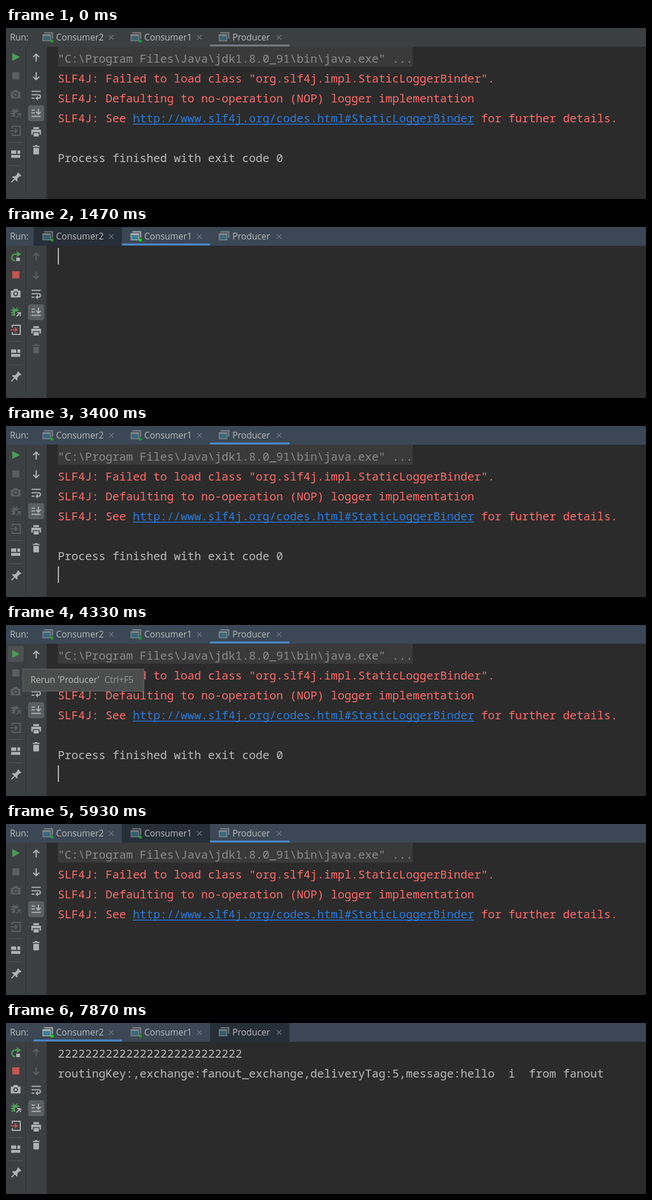
These frames come from a looping animation (1125x301 px, 8000 ms). An HTML page:

```html
<!DOCTYPE html>
<html lang="en">
<head>
<meta charset="utf-8">
<title>Run console</title>
<style>
  html, body { margin: 0; width: 100%; height: 100%; overflow: hidden; background: #2b2b2b; }
  svg { display: block; }
  text { white-space: pre; fill: #bbb; }
  .ui { font: 15.5px "Open Sans", "Noto Sans", sans-serif; }
  .code { font: 20px "Noto Sans Mono", "Liberation Mono", monospace; }
  .line { fill: none; }
</style>
</head>
<body>
<svg id="stage" width="1125" height="301" viewBox="0 0 1125 301"></svg>
<script>
const LOOP = 8000;
const ROW = 35;
const GREY = '#afb1b3', OFF = '#5b5e60', GREEN = '#499c54', RED = '#c75450', ERROR = '#ff6b68';
const PANEL = '#3c3f41', EDITOR = '#2b2b2b';
const stage = document.getElementById('stage');

const tabs = [
  { name: 'Consumer2', x: 48.6, w: 155, close: 136.4 },
  { name: 'Consumer1', x: 203.6, w: 155, close: 136.4 },
  { name: 'Producer', x: 358.6, w: 139.8, close: 121.4 }
];
const [C2, C1, PRODUCER, NONE] = [0, 1, 2, -1];

const command = { text: '"C:\\Program Files\\Java\\jdk1.8.0_91\\bin\\java.exe" ...', fill: '#8c8c8c', folded: true };
const error = text => ({ text, fill: ERROR });
const warnings = [
  error('SLF4J: Failed to load class "org.slf4j.impl.StaticLoggerBinder".'),
  error('SLF4J: Defaulting to no-operation (NOP) logger implementation'),
  error('SLF4J: See <tspan fill="#287bde">http://www.slf4j.org/codes.html#StaticLoggerBinder</tspan> for further details.')
];
warnings[2].link = [223, 600];
const plain = text => ({ text, fill: '#bbb' });
const warned = [command, ...warnings];
const finished = [...warned, plain(''), plain('Process finished with exit code 0')];
const received = digit => [
  plain(digit.repeat(27)),
  plain('routingKey:,exchange:fanout_exchange,deliveryTag:5,message:hello  i  from fanout')
];

// Toolbar looks: running process, available navigation, clearable output.
const idle = { running: false, nav: true, trash: true };
const listening = { running: true, nav: false, trash: false };

// Each step changes only the listed parts; caret is a row number, 0 hides it.
const steps = [
  [0, { focus: false, tab: PRODUCER, hover: NONE, rows: finished, caret: 0, ...idle }],
  [330, { hover: C2 }],
  [730, { hover: C1 }],
  [1070, { focus: true, caret: 7 }],
  [1130, { tab: C1, rows: [], caret: 1 }],
  [1200, listening],
  [1470, { hover: C2 }],
  [1670, { caret: 0 }],
  [2200, { caret: 1 }],
  [2400, { tab: C2 }],
  [2530, { hover: C1 }],
  [2600, { hover: PRODUCER }],
  [2870, { caret: 0 }],
  [3200, { tab: PRODUCER, rows: finished, caret: 7 }],
  [3270, idle],
  [3400, { hover: NONE }],
  [3730, { caret: 0 }],
  [3930, { upHover: true }],
  [4000, { upHover: false }],
  [4200, { caret: 7, playHover: '#4c5052' }],
  [4270, { tip: 0.6 }],
  [4330, { tip: 1 }],
  [4400, { tip: 0, playHover: '#5c6164' }],
  [4600, { playHover: '' }],
  [5000, { rows: [], caret: 0, dot: true, nav: false, trash: false }],
  [5200, { rows: [command] }],
  [5470, { rows: warned }],
  [5670, { running: true, nav: true, trash: true }],
  [5930, { ...idle, dot: false, hover: C1 }],
  [6070, { rows: finished, caret: 7 }],
  [6130, { tab: C1, rows: received('1'), caret: 3 }],
  [6200, { ...listening, trash: true }],
  [6670, { caret: 0 }],
  [6730, { hover: C2 }],
  [7200, { caret: 3 }],
  [7270, { tab: C2, rows: received('2') }],
  [7530, { hover: C1 }],
  [7670, { closeHover: true }],
  [7730, { closeHover: false, caret: 0 }],
  [7870, { hover: PRODUCER }]
];

const rect = (x, y, w, h, fill, extra = '') =>
  `<rect x="${x}" y="${y}" width="${w}" height="${h}" fill="${fill}" ${extra}/>`;
const shape = (d, fill, extra = '') => `<path d="${d}" fill="${fill}" ${extra}/>`;
const line = (d, stroke, width = 2.2) =>
  `<path class="line" d="${d}" stroke="${stroke}" stroke-width="${width}"/>`;
const label = (x, y, text, fill = '#bbb') =>
  `<text class="ui" x="${x}" y="${y}" style="fill:${fill}">${text}</text>`;

function drawTab(tab, i, s) {
  const { x, w } = tab, closeX = x + tab.close;
  const selected = s.tab === i, live = i !== PRODUCER || s.dot;
  const bright = selected && live;
  let out = '';
  if (s.hover === i) out += rect(x, 0, w, 33, s.focus ? '#262e37' : '#2b2d2f');
  if (selected) out += rect(x, 29, w, 3.5, s.focus ? '#4a88c7' : '#747a80');
  out += `<g opacity="${bright ? 1 : 0.6}">`
    + line(`M${x + 18.4} 8.5h14.5v10.5`, GREY, 2)
    + rect(x + 16.1, 12, 13.6, 10.6, '#3b7f98', `stroke="${GREY}" stroke-width="1.4"`)
    + rect(x + 15.4, 11, 15, 3, GREY)
    + '</g>'
    + (live ? `<circle cx="${x + 32.4}" cy="23" r="2.7" fill="${bright ? '#0be30b' : '#1e9e28'}"/>` : '')
    + label(x + 39.4, 22, tab.name);
  const hot = s.closeHover && s.hover === i;
  if (hot) out += `<circle cx="${closeX}" cy="16.5" r="7" fill="#767d84"/>`;
  return out + line(`M${closeX - 4} 12.5l8 8m0 -8l-8 8`, hot ? EDITOR : '#70777d', 1.3);
}

function drawHeader(s) {
  return rect(0, 0, 1125, 33, s.focus ? '#3b4754' : PANEL)
    + label(7, 22, 'Run:')
    + tabs.map((tab, i) => drawTab(tab, i, s)).join('');
}

function drawRunTools(s) {
  const on = s.running, tone = on ? GREY : OFF;
  const button = s.playHover ? rect(3, 37, 28, 28, s.playHover, 'rx="4"') : '';
  const start = on
    ? line('M16 59.3A5.8 5.8 0 0 1 16 47.7H20', GREEN, 2.5) + shape('M19 42.5l7.5 5.2l-7.5 5.2z', GREEN)
      + rect(18, 54, 6.5, 6, GREY)
    : shape('M11 44l13.5 7l-13.5 7z', GREEN);
  const camera = shape('M8.5 112h4l1.5-3h6l1.5 3h4v12h-17z', tone)
    + `<circle cx="17" cy="117.5" r="4.2" fill="${PANEL}"/><circle cx="17" cy="117.5" r="2.4" fill="${tone}"/>`;
  const body = on ? GREEN : OFF;
  const bug = `<ellipse cx="16" cy="150" rx="4.8" ry="6.6" fill="${body}"/>`
    + line('M9 146h14M8.5 150.5h15M9.5 155h8M12 141.5l2 3M20 141.5l-2 3', body, 1.8)
    + shape('M16 159v-10h10v10z', PANEL)
    + line('M18.5 157.5l6-6M19.5 151h5.8v6', tone, 2);
  const exit = line('M11 177v-4h14v16h-14v-4', tone, 2)
    + line('M8 181h11M15.3 177l4 4l-4 4', on ? RED : OFF, 2);
  const layout = rect(9, 215.5, 9, 6, GREY) + rect(20, 215.5, 5, 6, GREY) + rect(9, 223.5, 16, 5, GREY);
  const pin = shape('M-4 -10h8v2l-1.2 1v5.5l3.2 3v1.5h-5v7.5h-2v-7.5h-5v-1.5l3.2 -3v-5.5l-1.2 -1z',
    GREY, 'transform="translate(17 264) rotate(45)"');
  return button + start + rect(11, 78, 12.5, 12.5, on ? RED : OFF) + camera + bug + exit
    + rect(5, 201, 24, 1, '#55585a') + layout + rect(5, 242, 24, 1, '#55585a') + pin;
}

function drawOutputTools(s) {
  const nav = s.nav ? GREY : OFF, bin = s.trash ? GREY : OFF;
  return (s.upHover ? rect(39, 38, 28, 28, '#4c5052', 'rx="4"') : '')
    + line('M53 59v-12.5M47.7 51.3l5.3 -5.3l5.3 5.3', nav)
    + line('M53 78v12.5M47.7 85.7l5.3 5.3l5.3 -5.3', nav)
    + line('M45 111.5h16M45 117.5h12.5a3 3 0 0 1 0 6h-3M45 123.5h5', GREY, 2)
    + shape('M56 119.5v8l-4.5 -4z', GREY)
    + rect(39, 136, 28, 28, '#5a5f61', 'rx="4"')
    + line('M45 144.5h6M45 149.5h6M45 155.5h16M57 142v9M53 147.5l4 4l4 -4', GREY, 2)
    + rect(48, 174.5, 10, 3.5, GREY) + rect(44.5, 179, 17, 8.5, GREY)
    + rect(47, 183.5, 12, 4, PANEL) + rect(48.5, 185, 9, 6, GREY)
    + rect(47, 207.5, 12, 2, bin) + rect(51, 206, 4, 2, bin) + rect(48, 211, 10, 11.5, bin, 'rx="1"');
}

function drawRow(row, i) {
  const y = 61 + i * ROW;
  return (row.folded ? rect(91, 33, 624, 35, '#3a3a3a') : '')
    + `<text class="code" x="91" y="${y}" style="fill:${row.fill}">${row.text}</text>`
    + (row.link ? rect(row.link[0], y + 2.5, row.link[1], 1.5, '#287bde') : '');
}

function drawTip(opacity) {
  return `<g opacity="${opacity}">`
    + rect(29.5, 77.5, 213, 39, '#4b4d4d', 'stroke="#636569"')
    + label(43, 102, "Rerun 'Producer'") + label(173, 102, 'Ctrl+F5', '#999') + '</g>';
}

function draw(s) {
  stage.innerHTML = rect(0, 0, 1125, 301, EDITOR)
    + rect(0, 33, 72, 268, PANEL)
    + rect(34, 33, 1, 268, '#313335') + rect(71, 33, 1, 268, '#313335')
    + drawHeader(s)
    + s.rows.map(drawRow).join('')
    + (s.caret ? rect(91, 37 + (s.caret - 1) * ROW, 2, 29, '#bbb') : '')
    + drawRunTools(s) + drawOutputTools(s)
    + (s.tip ? drawTip(s.tip) : '');
}

let state = {};
const states = steps.map(([, change]) => state = { ...state, ...change });

let shown = -1;
const began = performance.now();
function tick() {
  const time = (performance.now() - began) % LOOP;
  const current = steps.findLastIndex(([start]) => start <= time);
  if (current !== shown) draw(states[shown = current]);
  requestAnimationFrame(tick);
}
tick();
</script>
</body>
</html>
```
